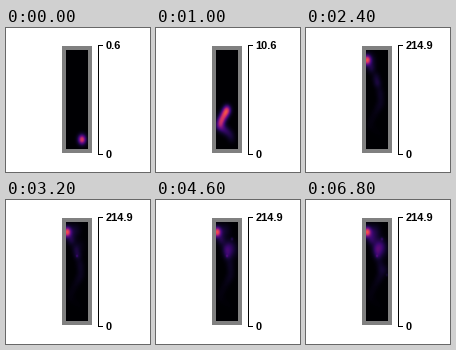
Animation, 144 px wide and 144 px high, one loop 8 s. Source, as a matplotlib script:

```python
import numpy as np
import matplotlib.pyplot as plt
from matplotlib.animation import FuncAnimation
from matplotlib.colors import LinearSegmentedColormap
from matplotlib.patches import Rectangle

SIZE, FRAMES, STEP = 144, 40, 200
LEFT, RIGHT, TOP, BOTTOM = 60, 82, 22, 121

# Position of the moving front at each step
TRAIL_X = [76, 74, 69, 63, 66, 71, 75, 74, 70, 61]
TRAIL_Y = [111.5, 106, 102, 98, 91, 82, 75, 64, 49, 32]

# first step, last step, x, y, width, amount
SPOTS = [
    (7, 8, 71, 54, 2.6, 14),
    (10, 12, 61, 32, 2.6, 100),
    (10, 12, 63, 33, 4.2, 30),
    (13, 16, 70, 30, 3.5, 14),
    (14, 18, 73, 46, 4, 16),
    (15, 15, 71, 56, 0.7, 28),
    (19, 23, 74, 50, 4.5, 32),
    (20, 22, 76, 39, 0.9, 26),
    (25, 29, 74, 45, 4, 20),
    (27, 30, 68, 36, 4, 17),
    (31, 34, 78, 70, 3, 15),
    (33, 34, 81, 75, 0.8, 18),
]

HEAT = LinearSegmentedColormap.from_list("heat", [
    (0, "#000003"), (0.1, "#10062c"), (0.25, "#3a0870"), (0.4, "#741080"),
    (0.55, "#bb2a72"), (0.68, "#e84055"), (0.8, "#f97530"), (1, "#fcd040")])

X, Y = np.meshgrid(np.arange(LEFT, RIGHT) + 0.5, np.arange(TOP, BOTTOM) + 0.5)


def peak(k):
    """Scale maximum, growing geometrically between its stages."""
    return np.exp(np.interp(k, [0, 5, 9, 12], np.log([0.6, 10.6, 47.2, 214.9])))


def blob(x, y, w):
    return np.exp(-((X - x) / w) ** 2 / 2 - ((Y - y) / (1.25 * w)) ** 2 / 2)


def field(k):
    total = np.zeros_like(X)
    steps = np.arange(len(TRAIL_X))
    for t in np.arange(0, min(k, steps[-1]) + 0.1, 0.5):
        x, y = np.interp(t, steps, TRAIL_X), np.interp(t, steps, TRAIL_Y)
        total += 0.42 * peak(t + 0.7) * blob(x, y, 2.7)
    for a, b, x, y, w, amount in SPOTS:
        total += np.clip((k - a + 1) / (b - a + 1), 0, 1) * amount * blob(x, y, w)
    return total / peak(k)


fig = plt.figure(figsize=(2, 2), dpi=SIZE / 2, facecolor="white")
ax = fig.add_axes([0, 0, 1, 1])


def box(x, y, w, h, color):
    ax.add_patch(Rectangle((x, y), w, h, fc=color, lw=0, antialiased=False))


def label(y, text):
    return ax.text(99.5, y, text, family="Liberation Sans", weight="bold",
                   size=11, color="black", va="baseline")


box(56, 18, 30, 107, "#808080")
box(92, 17, 1, 110, "black")
box(92, 17, 5, 1, "black")
box(92, 126, 5, 1, "black")
heat = ax.imshow(field(0), cmap=HEAT, vmin=0, vmax=1, aspect="auto",
                 interpolation="nearest", extent=(LEFT, RIGHT, BOTTOM, TOP),
                 zorder=2)
top = label(21, "")
label(130, "0")
ax.set(xlim=(0, SIZE), ylim=(SIZE, 0))
ax.axis("off")


def update(k):
    heat.set_data(field(k))
    top.set_text(f"{peak(k):.1f}")
    return heat, top


anim = FuncAnimation(fig, update, frames=FRAMES, interval=STEP, repeat=True,
                     repeat_delay=0)
plt.show()
```
